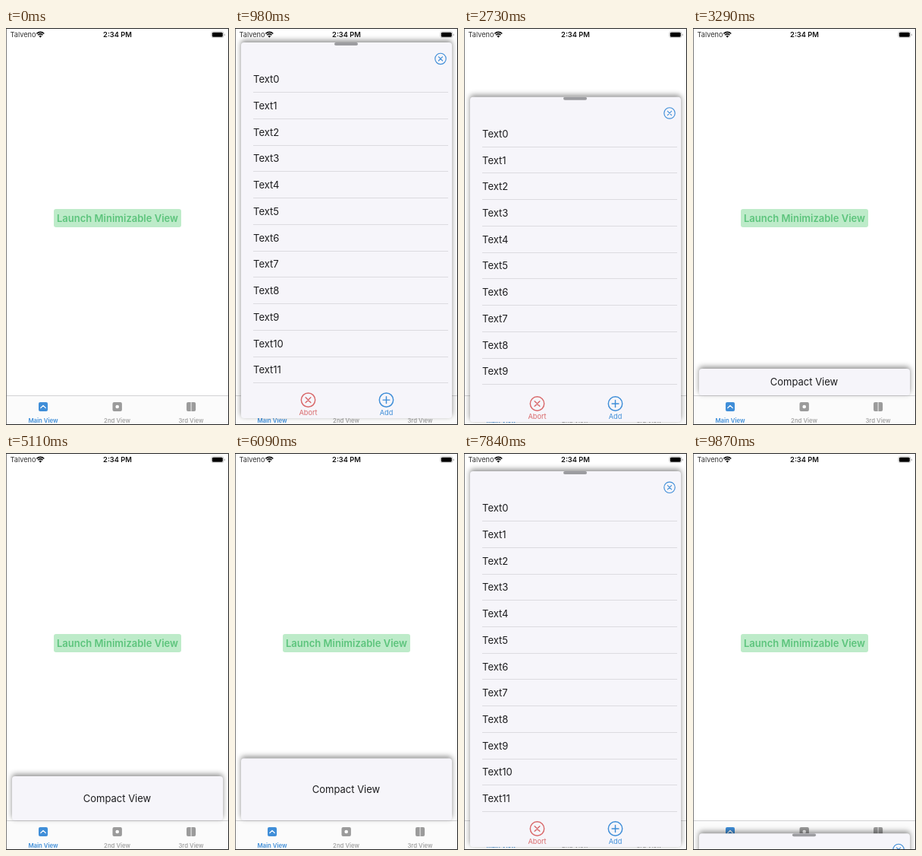
Animation, 294 px wide and 522 px high, one loop 9.94 s. Source, as an HTML page with a canvas:

```html
<!DOCTYPE html>
<html lang="en">
<head>
<meta charset="utf-8">
<title>Minimizable sheet</title>
<style>
  html, body { margin: 0; width: 100%; height: 100%; overflow: hidden; background: #fff; }
  canvas { display: block; width: 294px; height: 522px; }
</style>
</head>
<body>
<canvas id="stage"></canvas>
<script>
const W = 294, H = 522, LOOP = 9940, TICK = 70;
const OPEN_TOP = 24, OPEN_BOTTOM = 518, BAR_TOP = 448, BAR_BOTTOM = 483;
const BLUE = '#3f8ed8', RED = '#d9696b', GRAY = '#9b9b9b', INK = '#1c1c1e';
const FONT = 'Inter, "Liberation Sans", sans-serif';

const canvas = document.getElementById('stage');
const ctx = canvas.getContext('2d');
const dpr = window.devicePixelRatio || 1;
canvas.width = W * dpr;
canvas.height = H * dpr;

const clamp = (v, lo = 0, hi = 1) => Math.min(hi, Math.max(lo, v));
const lerp = (a, b, k) => a + (b - a) * k;
const easeInOut = u => u < 0.5 ? 2 * u * u : 1 - 2 * (1 - u) * (1 - u);

// Remaining distance of a damped spring: response 0.55 s, damping 0.825.
function spring(ms) {
  const t = Math.max(0, ms / 1000), w = 2 * Math.PI / 0.55, z = 0.825;
  const wd = w * Math.sqrt(1 - z * z);
  return Math.exp(-z * w * t) * (Math.cos(wd * t) + z * w / wd * Math.sin(wd * t));
}

function track(t, keys) {
  for (let i = 1; i < keys.length; i++) {
    const [t0, v0] = keys[i - 1], [t1, v1] = keys[i];
    if (t <= t1) return lerp(v0, v1, clamp((t - t0) / (t1 - t0)));
  }
  return keys[keys.length - 1][1];
}

// full: 1 shows the list, 0 shows the compact bar.
function sheetAt(t) {
  const slide = top => ({ top, bottom: top + OPEN_BOTTOM - OPEN_TOP, full: 1 });
  if (t < 560) return null;
  if (t < 1610) return slide(OPEN_TOP + 506 * spring(t - 520));
  if (t < 2800) {
    const u = clamp((t - 2380) / 420);
    return { top: OPEN_TOP + 96 * u * u, bottom: OPEN_BOTTOM, full: 1 };
  }
  if (t < 4830) {
    const r = clamp(spring(t - 2800));
    return { top: lerp(BAR_TOP, 120, r), bottom: lerp(BAR_BOTTOM, OPEN_BOTTOM, r), full: r };
  }
  if (t < 6510) {
    const top = track(t, [[4760, BAR_TOP], [5110, 425], [5810, 405], [6510, 396]]);
    return { top, bottom: BAR_BOTTOM, full: 0 };
  }
  if (t < 9520) {
    const r = clamp(spring(t - 6510));
    return { top: lerp(OPEN_TOP, 396, r), bottom: lerp(OPEN_BOTTOM, BAR_BOTTOM, r), full: 1 - r };
  }
  return slide(OPEN_TOP + 508 * easeInOut(clamp((t - 9475) / 480)));
}

function text(str, x, y, size, color, weight = 400, align = 'center') {
  ctx.font = `${weight} ${size}px ${FONT}`;
  ctx.textAlign = align;
  ctx.textBaseline = 'alphabetic';
  ctx.fillStyle = color;
  ctx.fillText(str, x, y + size * 0.36);
}

function box(x, y, w, h, r, color) {
  ctx.beginPath();
  ctx.roundRect(x, y, w, h, r);
  ctx.fillStyle = color;
  ctx.fill();
}

function lines(color, width, ...paths) {
  ctx.strokeStyle = color;
  ctx.lineWidth = width;
  ctx.lineCap = ctx.lineJoin = 'round';
  ctx.beginPath();
  for (const p of paths) p.forEach(([x, y], i) => i ? ctx.lineTo(x, y) : ctx.moveTo(x, y));
  ctx.stroke();
}

function disc(x, y, r, color) {
  ctx.beginPath();
  ctx.arc(x, y, r, 0, 2 * Math.PI);
  ctx.fillStyle = color;
  ctx.fill();
}

function ringIcon(x, y, r, color, plus) {
  const d = r * (plus ? 0.48 : 0.36), w = r * 0.16;
  ctx.beginPath();
  ctx.arc(x, y, r, 0, 2 * Math.PI);
  ctx.strokeStyle = color;
  ctx.lineWidth = w;
  ctx.stroke();
  if (plus) lines(color, w, [[x - d, y], [x + d, y]], [[x, y - d], [x, y + d]]);
  else lines(color, w, [[x - d, y - d], [x + d, y + d]], [[x - d, y + d], [x + d, y - d]]);
}

function drawStatus() {
  text('Talveno', 5.5, 9, 9.2, '#333', 400, 'left');
  ctx.lineCap = 'butt';
  ctx.strokeStyle = '#111';
  ctx.lineWidth = 1.6;
  for (const r of [7, 4.5]) {
    ctx.beginPath();
    ctx.arc(45.3, 12.4, r, -Math.PI * 0.75, -Math.PI * 0.25);
    ctx.stroke();
  }
  ctx.beginPath();
  ctx.moveTo(45.3, 12.8);
  ctx.arc(45.3, 12.4, 2.5, -Math.PI * 0.75, -Math.PI * 0.25);
  ctx.fillStyle = '#111';
  ctx.fill();
  text('2:34 PM', 147, 9, 9.3, '#111', 600);
  box(270.5, 4.5, 16.5, 8.5, 2.4, '#b5b5b5');
  box(271.1, 5.1, 15.3, 7.3, 2, '#fff');
  box(271.8, 5.7, 13.9, 6.1, 1.5, '#000');
  box(287.6, 7.4, 1.1, 2.8, 0.6, '#aaa');
}

function drawTabs() {
  box(1, 483, 292, 39, 0, '#fbfbfb');
  box(1, 483, 292, 1, 0, '#d2d2d4');

  box(43, 492, 12, 12, 2, BLUE);
  lines('#fff', 1.2, [[45.8, 499.5], [49, 496.4], [52.2, 499.5]]);
  box(140.5, 492, 12.4, 12, 2, GRAY);
  disc(146.7, 498, 2.3, '#fff');
  box(238, 492, 5.6, 12, [2, 0, 0, 2], GRAY);
  box(244.5, 492, 5.6, 12, [0, 2, 2, 0], GRAY);

  text('Main View', 49, 516, 7.8, BLUE, 600);
  text('2nd View', 146.5, 516, 7.8, GRAY, 500);
  text('3rd View', 244, 516, 7.8, GRAY, 500);
}

function drawList({ top, bottom }) {
  const pitch = 34.73, left = 24;
  ctx.save();
  ctx.beginPath();
  ctx.rect(8, top, 278, Math.max(0, bottom - 43 - top));
  ctx.clip();
  for (let i = 0; i < 12; i++) {
    const y = top + 48.5 + i * pitch;
    text('Text' + i, left, y, 13, INK, 400, 'left');
    box(left, Math.round(y + 16.6), 257, 1, 0, '#dcdbe0');
  }
  ctx.restore();

  ringIcon(271, top + 21.3, 7.2, BLUE);
  box(131, top, 31, 4, 2, '#9c9ca0');

  const y = bottom - 24;
  ringIcon(96.5, y, 9.2, RED);
  ringIcon(199.5, y, 9.2, BLUE, true);
  text('Abort', 96.5, y + 17, 9.2, RED);
  text('Add', 199.5, y + 17, 9.2, BLUE);
}

function drawSheet(s) {
  const h = s.bottom - s.top;
  ctx.save();
  ctx.shadowColor = 'rgba(0,0,0,0.45)';
  ctx.shadowBlur = 7 * dpr;
  ctx.shadowOffsetY = -2.5 * dpr;
  box(8, s.top, 278, h, 4, '#f6f5fa');
  ctx.restore();

  ctx.save();
  ctx.beginPath();
  ctx.roundRect(8, s.top, 278, h, 4);
  ctx.clip();
  if (s.full > 0) {
    ctx.globalAlpha = s.full;
    drawList(s);
  }
  ctx.globalAlpha = clamp(1 - 1.5 * s.full);
  if (ctx.globalAlpha > 0) text('Compact View', 146.5, (s.top + s.bottom) / 2, 13, INK);
  ctx.restore();
}

function draw(t) {
  ctx.setTransform(dpr, 0, 0, dpr, 0, 0);
  ctx.fillStyle = '#fff';
  ctx.fillRect(0, 0, W, H);
  drawStatus();
  box(63, 238, 168, 24, 3, '#bdebc9');
  text('Launch Minimizable View', 147, 250, 13, '#5cc47c', 600);
  drawTabs();
  const sheet = sheetAt(t);
  if (sheet) drawSheet(sheet);
  ctx.strokeStyle = '#222';
  ctx.lineWidth = 1;
  ctx.strokeRect(0.5, 0.5, W - 1, H - 1);
}

const start = performance.now();
function frame() {
  const t = (performance.now() - start) % LOOP;
  draw(Math.floor(t / TICK) * TICK);
  requestAnimationFrame(frame);
}
frame();
</script>
</body>
</html>
```
